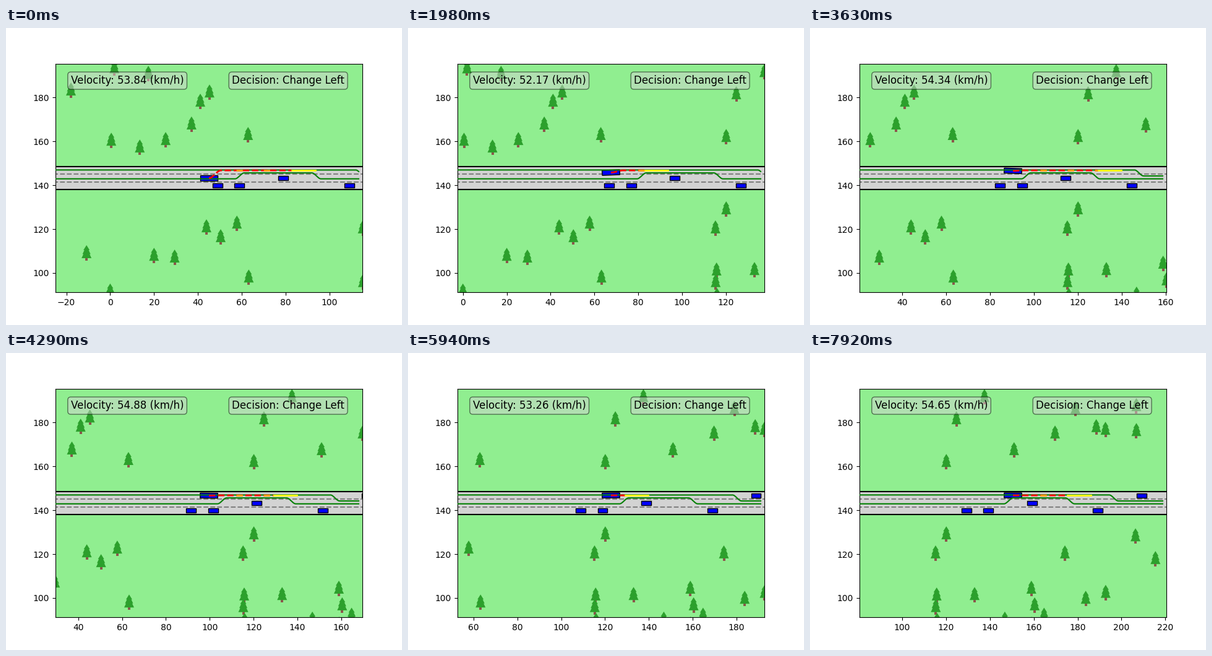
A matplotlib script for the animation above (8 s loop, 640 by 480 pixels).

```python
import numpy as np
import matplotlib.pyplot as plt
from matplotlib.animation import FuncAnimation
from matplotlib.collections import PolyCollection
from matplotlib.patches import Rectangle

STEP = 330          # ms each simulation state stays on screen
TICK = 40           # ms per animation frame
LOOP = 8000
HALF = 70           # half of the visible road length
SCALE = 496 / (2 * HALF)    # pixels per metre
ROAD_Y, VIEW_Y = 143.3, 143.33
VIEW_H = 369.6 / SCALE
LANE = 3.5
LEFT_Y = ROAD_Y + LANE
FAR = [-500, 700]

PLAN_STATES = 10    # states between two replans
PLAN_LEN = 46.25
TAIL = 10.8         # last part of a plan, never driven

# (state, ego x): even cruising with a hop at each replan
ROUTE = [(0, 45.05), (1, 45.35), (2, 50.1), (4, 58.57), (9, 80.97),
         (10, 88.8), (11, 90.4), (19, 127.3), (20, 136.33), (21, 136.6),
         (24, 150.5)]
# (state, km/h)
SPEED = [(0, 53.84), (4, 51.09), (9, 53.79), (13, 54.88), (18, 53.26),
         (20, 53.21), (24, 54.65)]

CARS = [(49, -1), (59, -1), (109, -1), (78.9, 0), (129, 1)]  # start x, lane

# scenery layout along the road
TREES = [
    (-17.9, 183.5), (1.9, 193.6), (17.4, 191.1), (41.1, 178.4), (45.3, 182.6),
    (37.1, 168.0), (0.5, 160.6), (13.5, 157.5), (25.3, 160.9), (62.9, 163.2),
    (-10.8, 109.3), (0.0, 91.8), (20.0, 108.1), (29.4, 107.3), (43.9, 121.1),
    (50.4, 116.6), (57.8, 122.8), (63.2, 98.2), (115.2, 120.6), (115.3, 96.1),
    (124.7, 181.8), (120.1, 162.3), (120.1, 129.3), (115.7, 101.4),
    (115.9, 89.8), (137.5, 191.9), (151.0, 167.7), (133.0, 101.6),
    (146.8, 90.4), (169.7, 175.3), (158.9, 104.5), (160.4, 96.9),
    (164.7, 92.2), (179.0, 186.6), (188.5, 178.2), (192.7, 177.0),
    (174.2, 120.6), (183.7, 99.9), (192.8, 102.6), (206.4, 128.4),
    (206.8, 187.8), (206.8, 176.4), (215.5, 118.0), (159.0, 88.1)]

# tree outlines in pixels: right half of the crown, mirrored; then the trunk
CROWN = [(0, 12), (5, 4), (3.5, 4), (6.5, -2.5), (5, -2.5), (8, -9)]
CROWN = np.array(CROWN + [(-x, y) for x, y in CROWN[:0:-1]]) / SCALE
TRUNK = np.array([(-2, -13), (2, -13), (2, -8), (-2, -8)]) / SCALE


def smooth(u):
    u = np.clip(u, 0, 1)
    return u * u * (3 - 2 * u)


def ramp(x, center, width=4.2):
    return smooth((x - center) / width + 0.5)


def follow(points, n):
    return np.interp(n, *zip(*points))


def add_trees(color, z):
    return ax.add_collection(PolyCollection(
        [], facecolors=color, edgecolors="none", zorder=z), autolim=False)


def add_car(length, width, z):
    car = Rectangle((0, 0), length, width, rotation_point="center",
                    facecolor="blue", edgecolor="black", lw=1, zorder=z)
    return ax.add_patch(car)


def place(car, x, y):
    car.set_xy((x - car.get_width() / 2, y - car.get_height() / 2))


def add_line(color, z, lw=1.5, style="-"):
    return ax.plot([], [], color=color, lw=lw, linestyle=style, zorder=z)[0]


def add_label(x, text):
    return ax.text(x, 0.95, text, transform=ax.transAxes, fontsize=12,
                   va="top", zorder=10,
                   bbox=dict(boxstyle="round", facecolor="lightgray", alpha=0.5))


fig = plt.figure(figsize=(6.4, 4.8), dpi=100)
ax = fig.add_subplot()
ax.set_facecolor("lightgreen")
ax.set_ylim(VIEW_Y - VIEW_H / 2, VIEW_Y + VIEW_H / 2)

ax.fill_between(FAR, ROAD_Y - 1.5 * LANE, ROAD_Y + 1.5 * LANE,
                color="lightgray", lw=0, zorder=1)
for k in (-1.5, -0.5, 0.5, 1.5):
    edge = abs(k) > 1
    ax.plot(FAR, [ROAD_Y + k * LANE] * 2, "-" if edge else "--",
            color="black" if edge else "gray", lw=1.5, zorder=2)

trunks = add_trees("#8c564b", 2.0)
crowns = add_trees("#2ca02c", 2.1)
cars = [add_car(4.5, 2.0, 3) for _ in CARS]
ego = add_car(8.0, 2.3, 3.1)
upper = add_line("green", 4)
lower = add_line("green", 4)
tail = add_line("yellow", 5, 2)
path = add_line("red", 6, 2, "--")
# every third dash of the path is orange
accent = add_line("orange", 7, 2, (0, (3.7, 12.2)))

speed_label = add_label(0.05, "")
add_label(0.575, "Decision: Change Left")


def update(i):
    n = (i * TICK + 30) // STEP
    plan = n // PLAN_STATES
    x0 = follow(ROUTE, n)
    y0 = LEFT_Y - LANE * np.exp(-(n / 5) ** 1.3)

    ax.set_xlim(x0 - HALF, x0 + HALF)
    speed_label.set_text(f"Velocity: {follow(SPEED, n):.2f} (km/h)")

    seen = [t for t in TREES if abs(t[0] - x0) < HALF + 0.3]
    trunks.set_verts([TRUNK + t for t in seen])
    crowns.set_verts([CROWN + t for t in seen])

    # traffic is slower than the ego vehicle and falls back steadily
    driven = x0 - ROUTE[0][1]
    shift = 0.8 * driven - 0.00037 * driven ** 2
    for car, (x, lane) in zip(cars, CARS):
        place(car, x + shift, ROAD_Y + lane * LANE)
    place(ego, x0, y0)
    ego.set_angle(18 * np.sin(np.pi * n / 7) * np.exp(-n / 5))

    # drivable corridor, narrowed beside slower cars
    rel = np.linspace(-HALF - 5, 68.3, 500)
    bump = ramp(rel, 14 - 8 * plan) - ramp(rel, 49 - 11.5 * plan)
    upper.set_data(x0 + rel, 147.0 - 2.75 * ramp(rel, 69 - 11.5 * plan))
    lower.set_data(x0 + rel, 142.95 + 2.7 * bump)

    # planned trajectory
    def draw(line, a, b):
        xs = np.linspace(a, max(a, b), 100)
        line.set_data(xs, y0 + (LEFT_Y - y0) * smooth((xs - x0) / 5.5))

    end = 93.5 + PLAN_LEN * plan
    mid = end - TAIL
    draw(path, x0, mid)
    draw(tail, max(mid, x0), end)
    draw(accent, x0 + 3 * 14.72 / SCALE, mid)
    return []


anim = FuncAnimation(fig, update, frames=LOOP // TICK, interval=TICK,
                     repeat=True, repeat_delay=0, blit=False)
plt.show()
```
